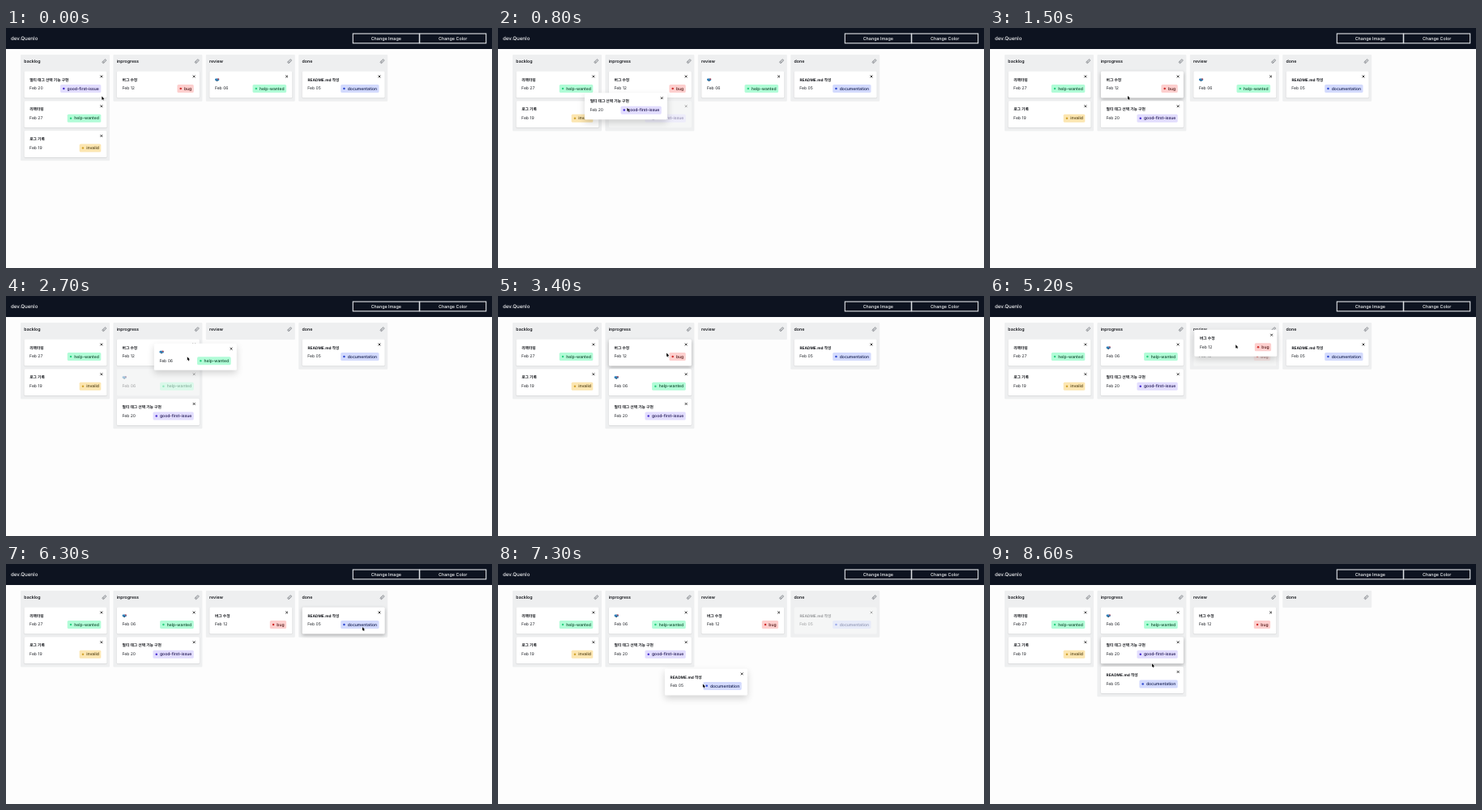
Write an HTML page with a canvas that moves like this. It is 600 px wide and 297 px high and loops after 8700 ms.

```html
<!DOCTYPE html>
<html lang="ko">
<head>
<meta charset="utf-8">
<title>Board</title>
<style>
html, body { margin: 0; width: 100%; height: 100%; overflow: hidden; background: #fdfdfd; }
canvas { display: block; width: 600px; height: 297px; }
</style>
</head>
<body>
<canvas id="stage"></canvas>
<script>
const W = 600, H = 297, LOOP = 8700, STEP = 100;
const SANS = 'Inter, "Noto Sans CJK KR", "Noto Sans CJK", sans-serif';
const PITCH = 114.4;
const CARD = { x: 22.5, y: 53.5, w: 102, h: 33, pitch: 36.75 };
const NAMES = ['backlog', 'inprogress', 'review', 'done'];

// Hue and background lightness
const TAGS = {
  'good-first-issue': [250, 93],
  'help-wanted': [151, 84],
  'invalid': [43, 84],
  'bug': [1, 90],
  'documentation': [230, 91]
};

const CARDS = {
  m: ['멀티 태그 선택 기능 구현', 'Feb 20', 'good-first-issue'],
  r: ['리팩터링', 'Feb 27', 'help-wanted'],
  l: ['로그 기록', 'Feb 19', 'invalid'],
  b: ['버그 수정', 'Feb 12', 'bug'],
  h: ['', 'Feb 06', 'help-wanted'],
  d: ['README.md 작성', 'Feb 05', 'documentation']
};

const START = { board: ['mrl', 'b', 'h', 'd'], pointer: [118.3, 84.5] };

// Pointer glides; those with a card drag it to a column and row.
const STORY = [
  { from: 200, to: 400, at: [75, 72] },
  { from: 400, to: 1000, at: [189, 108], card: 'm', col: 1, row: 1, cross: 800 },
  { from: 1200, to: 1500, at: [170, 84] },
  { from: 1500, to: 1800, at: [292.3, 70], bend: [[495, 72]] },
  { from: 2000, to: 2700, at: [223.8, 75.3], bend: [[109, 79]], card: 'h', col: 1, row: 1, cross: 2300 },
  { from: 3000, to: 3700, at: [197.9, 67.5] },
  { from: 3900, to: 4600, at: [187.9, 72], bend: [[293, -100], [330, 200]], card: 'b', col: 1, row: 0, cross: 3900 },
  { from: 4800, to: 5500, at: [302, 72], bend: [[316, 56]], card: 'b', col: 2, row: 0, cross: 5100 },
  { from: 5800, to: 6300, at: [440, 78], bend: [[176, 125]] },
  { from: 6500, to: 6700, at: [412.7, 72.5] },
  { from: 6900, to: 8200, at: [185, 146], bend: [[161, 227], [200, 100]], card: 'd', col: 1, row: 2, cross: 7800 },
  { from: 8300, to: 8600, at: [200, 123.2] }
];

const canvas = document.getElementById('stage');
const dpr = window.devicePixelRatio || 1;
canvas.width = W * dpr;
canvas.height = H * dpr;
const ctx = canvas.getContext('2d');
ctx.scale(dpr, dpr);
ctx.textRendering = 'geometricPrecision';

// Cubic curve; without a bend it is a straight line, eased at both ends.
function glide(p, { from, to, at, bend = [p, at] }, t) {
  const u = Math.min(1, (t - from) / (to - from)), v = 1 - u;
  const [a, b = a] = bend;
  return [0, 1].map(i =>
    v * v * v * p[i] + 3 * v * v * u * a[i] + 3 * v * u * u * b[i] + u * u * u * at[i]);
}

function move(board, { card, col, row }) {
  return board.map((ids, c) => {
    const rest = ids.replace(card, '');
    return c === col ? rest.slice(0, row) + card + rest.slice(row) : rest;
  });
}

function slot(col, row) {
  return [CARD.x + col * PITCH, CARD.y + row * CARD.pitch];
}

function place(board, id) {
  const col = board.findIndex(ids => ids.includes(id));
  return slot(col, board[col].indexOf(id));
}

// On release the board snaps back for one step before the move stays.
function sceneAt(t) {
  let { board, pointer } = START, held = null;
  for (const leg of STORY.filter(s => s.from <= t)) {
    const next = glide(pointer, leg, t);
    if (leg.card) {
      const drop = leg.to + STEP;
      if (t < drop) {
        const [x, y] = place(board, leg.card);
        held = { id: leg.card, x: x + next[0] - pointer[0], y: y + next[1] - pointer[1] };
      }
      if (t >= drop + STEP || (held && t >= leg.cross)) board = move(board, leg);
    }
    pointer = next;
  }
  return { board, pointer, held };
}

function text(str, x, y, size, weight, color, align = 'left') {
  ctx.font = `${weight} ${size}px ${SANS}`;
  ctx.fillStyle = color;
  ctx.textAlign = align;
  ctx.fillText(str, x, y);
}

function box(x, y, w, h, r, color) {
  ctx.fillStyle = color;
  ctx.beginPath();
  ctx.roundRect(x, y, w, h, r);
  ctx.fill();
}

function line(color, width, ...points) {
  ctx.strokeStyle = color;
  ctx.lineWidth = width;
  ctx.beginPath();
  points.forEach(([x, y]) => ctx.lineTo(x, y));
  ctx.stroke();
}

function shadow(alpha, blur, dy) {
  ctx.shadowColor = `rgba(0,0,0,${alpha})`;
  ctx.shadowBlur = blur * dpr;
  ctx.shadowOffsetY = dy * dpr;
}

function drawHeader() {
  box(0, 0, W, 26, 0, '#0d1320');
  text('dev.Quenlo', 6, 15.1, 6.2, 500, '#f3f4f6');
  ctx.strokeStyle = '#e3e5e9';
  ctx.lineWidth = 1.1;
  ['Change Image', 'Change Color'].forEach((label, i) => {
    const x = 428.3 + i * 82.4;
    ctx.strokeRect(x, 7, 82, 11.8);
    text(label, x + 41, 14.7, 5.4, 500, '#f3f4f6', 'center');
  });
}

function drawPencil(x, y) {
  ctx.save();
  ctx.translate(x, y);
  ctx.rotate(-Math.PI / 4);
  box(-2.8, -1.2, 5.6, 2.4, 0.8, '#c9cbce');
  ctx.strokeStyle = '#6b6e74';
  ctx.lineWidth = 0.5;
  ctx.stroke();
  line('#6b6e74', 0.5, [-1.3, -1.2], [-1.3, 1.2]);
  ctx.restore();
}

function drawCross(x, y, r = 1.4) {
  for (const s of [-1, 1]) line('#111', 0.8, [x - r, y - r * s], [x + r, y + r * s]);
}

function drawMailbox(x, y) {
  box(x, y + 0.9, 5.2, 2.9, 1.2, '#2f7fb8');
  box(x + 1.6, y + 3.4, 1.8, 1, 0, '#35506a');
  box(x + 3.3, y + 1, 1.8, 1.2, 0.3, '#d8474b');
}

function drawTag(tag, right, y) {
  const [hue, light] = TAGS[tag];
  ctx.font = `500 5.05px ${SANS}`;
  const w = ctx.measureText(tag).width + 11, x = right - w;
  box(x, y, w, 10, 1.6, `hsl(${hue} 92% ${light}%)`);
  box(x + 3, y + 3.7, 2.5, 2.5, 1.25, `hsl(${hue} 65% 50%)`);
  text(tag, x + 8.5, y + 6.7, 5.05, 500, `hsl(${hue} 65% 18%)`);
}

function drawCard(id, x, y, mode) {
  const [title, date, tag] = CARDS[id];
  ctx.save();
  if (mode === 'ghost') ctx.globalAlpha = 0.4;
  else if (mode === 'drag') shadow(0.17, 8, 3.8);
  else if (mode === 'hover') shadow(0.28, 4, 1.8);
  else shadow(0.16, 1.3, 0.4);
  box(x, y, CARD.w, CARD.h, 1.5, '#fff');
  shadow(0, 0, 0);

  if (title) text(title, x + 6.7, y + 12.2, 4.75, 700, '#16181d');
  else drawMailbox(x + 6.7, y + 8);
  text(date, x + 6.6, y + 22.9, 5.05, 400, '#1d2026');
  drawCross(x + 95.3, y + 6.5);
  drawTag(tag, x + 94.8, y + 16.5);
  ctx.restore();
}

function drawCursor(x, y) {
  ctx.save();
  ctx.translate(x, y);
  ctx.scale(0.85, 0.85);
  ctx.lineJoin = 'round';
  line('#fff', 0.8, [0, 0], [0, 5.2], [1.2, 4.2], [2, 6], [2.9, 5.6], [2.1, 3.9], [3.7, 3.8], [0, 0]);
  ctx.fillStyle = '#000';
  ctx.fill();
  ctx.restore();
}

function drawBoard({ board, pointer: [px, py], held }, moved) {
  board.forEach((ids, col) => {
    const [left] = slot(col, 0);
    box(left - 4.5, 33, 110, 20.9 + ids.length * CARD.pitch, 1, '#eeeff0');
    text(NAMES[col], left - 0.2, 43.4, 5.25, 600, '#16181d');
    drawPencil(left + 98.8, 41.2);
    [...ids].forEach((id, row) => {
      const [x, y] = slot(col, row);
      const over = moved && !held && px > x && px < x + CARD.w && py > y && py < y + CARD.h;
      drawCard(id, x, y, held?.id === id ? 'ghost' : over ? 'hover' : 'rest');
    });
  });
}

function draw(t) {
  const scene = sceneAt(t), { pointer, held } = scene;
  box(0, 0, W, H, 0, '#fdfdfd');
  drawBoard(scene, t > STORY[0].from);
  if (held) drawCard(held.id, held.x, held.y, 'drag');
  drawHeader();
  drawCursor(...pointer);
}

const start = performance.now();
function tick() {
  const t = (performance.now() - start) % LOOP;
  draw(Math.floor(t / STEP) * STEP);
  requestAnimationFrame(tick);
}
tick();
</script>
</body>
</html>
```
